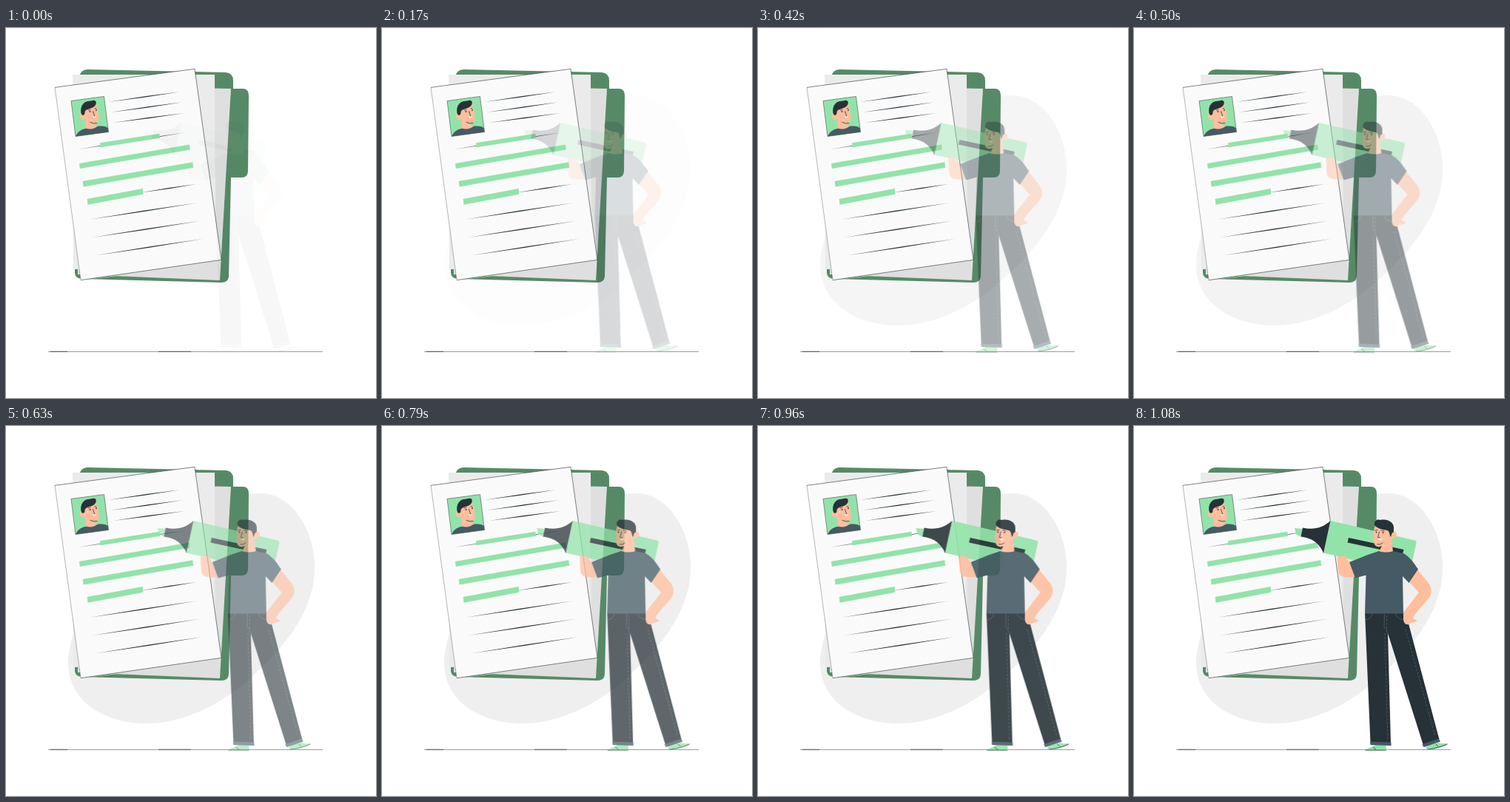
These frames come from a looping animation (500x500 px, 1.12 s). An HTML page:

```html
<!DOCTYPE html>
<html lang="en">
<head>
<meta charset="utf-8">
<title>Resume review</title>
<style>
  html, body { margin: 0; width: 100%; height: 100%; overflow: hidden; background: #fff; }
  svg { display: block; width: 100vw; height: 100vh; }
  .folder { fill: #568a66; }
  .green { fill: #92e3a9; }
  .dark { fill: #263238; }
  .slate { fill: #455a64; }
  .skin { fill: #ffbe9d; }
  .thin { fill: none; stroke: #263238; stroke-width: .8; stroke-linecap: round; }
  .seam { fill: none; stroke: #56666e; stroke-width: .7; }
  .stitch { stroke-dasharray: 3 2; }
</style>
</head>
<body>
<svg viewBox="0 0 500 500">
  <path id="blob" fill="#efefef" d="M340 91C385 88 417 140 417 190C417 255 370 305 325 345C285 380 235 402 190 402C130 402 84 370 84 320C84 295 95 260 120 230C180 160 280 95 340 91Z"/>

  <path stroke="#777" stroke-width=".8" d="M57 437.3H428"/>
  <path stroke="#444" stroke-width=".8" d="M60 437.3H83M206 437.3H250"/>

  <!-- folder and loose sheets -->
  <path class="folder" d="M99 66Q101 56 110 56L297 60Q307 61 307 71V82H320Q328 82 328 91L327 194Q326 202 319 202H304L301 336Q300 344 291 344L103 339Q93 338 93 331V325H99Z"/>
  <path fill="#dfdfdf" d="M110 78L304 82L289 341L97 333V325Z"/>
  <path fill="#ebebeb" d="M90 63H282L283 323L91 326Z"/>
  <path fill="#dfdfdf" d="M101 341L291 313L289 318L283 323L150 335Z"/>

  <!-- page -->
  <path fill="#fafafa" stroke="#263238" stroke-width=".6" d="M101 340.7L291 313.3L255 55.3L66 80.3"/>
  <path stroke="#263238" stroke-width=".35" d="M66 80.3L101 340.7"/>
  <g id="rules" class="dark"></g>
  <g id="marks" class="green"></g>

  <!-- portrait -->
  <path class="green" stroke="#263238" stroke-width=".5" d="M88 98.5L132.5 92.5L138.5 140.5L94 146.5Z"/>
  <path class="slate" d="M94 146.5C97 139 104 136 112 135L125 132.5C132 132 136 133 138 135.5L138.5 140.5Z"/>
  <path class="skin" d="M103 112L123 104C125 112 127 123 124 128C121 131 117 130 114 129L124 132.5C119 137 113 137 108 135.5L108 124C103 125 99 122 100 118C100 116 102 115 103 116Z"/>
  <path class="dark" d="M103 118C100 114 101 106 104 103C107 98 114 99 117 98C121 97 123 100 121 104C117 110 111 108 107 112L106 117Z"/>
  <path class="thin" d="M117.5 112.5L120 120L117 121M111 111L114 110.3M120 109L122 108.5M114 127.5Q119 130 123 128.5"/>
  <circle class="dark" cx="113.5" cy="113" r=".9"/><circle class="dark" cx="122" cy="111" r=".9"/>
  <path fill="#fff" d="M116 120.5L122 119Q120 123 116 120.5Z"/>

  <g id="man">
    <!-- highlighter -->
    <path class="green" d="M265.5 128L379 154.5Q382 155.500 381.500 158L374 192Q373 198 368 197L256 171.500Z"/>
    <path class="green" d="M217 138L229 139L225.500 149.500L219 146.500Z"/>
    <path class="dark" d="M228 137.500C243 141 256 137 265.500 128L256 172C252 160 241 151 225.500 149.500Z"/>
    <path class="dark" d="M290 151L364.500 167L363 173.500L288.500 157.500Z"/>

    <!-- shoes and trousers -->
    <path class="green" d="M312 438.500C314 435 321 435 326 431H340.500L341 438.500Z"/>
    <path class="green" d="M394 435L397 431L412 428C416 430 420 428 424 429.500C423 433 406 437 398 438Z"/>
    <path class="thin" stroke-width=".4" d="M313 438H340M397 437Q412 435 423 430M323 434L327 437M408 430L411 433"/>
    <path class="dark" d="M312 252H367L412.500 423.500L391 431.500L343 280L347 428H319.500Z"/>
    <path class="slate" d="M319 426.500L347.500 427.500V432L319.500 431Z"/>
    <path class="slate" d="M389.500 430L412 422.500L414 426.500L391.500 434Z"/>
    <path class="seam" d="M338.500 254L338 271Q341 274 342.500 280M313 262Q320 261 322 254M353 254Q357 262 368 262"/>
    <path class="seam stitch" d="M341.500 256V274M339 280L343 424M367 275L407 419"/>

    <!-- arms -->
    <path class="skin" d="M275 178C276 174 280 177 282 176C285 175 287 177 288 181L293 188L300 203.500C293 205 284 205 279 202C275 199 276 190 275 178Z"/>
    <path class="skin" d="M383 194L397 211C402 217 403 224 400 230C393 241 384 247 377 259C380 262 381 262 383 263C379 266 374 265 371 268C367 269 364 266 364 260V252L385 225L371 210Z"/>

    <!-- head -->
    <path class="skin" d="M326 134C323 143 323 153 325 160C328 165 333 163 335 162L331 170C337 175 345 175 350 170L348 152C352 153 355 150 355 146C355 142 351 142 349 144L345 134Z"/>
    <path class="dark" d="M325 134C324 129 328 125 333 127C342 125 351 130 351 137V143L348.500 145L347 150C345 148 346 142 342 141C337 140 329 139 325 134Z"/>
    <path class="thin" d="M331.500 143L329.500 150.500L332.500 151M326 141L329 140.500M334 141L338 142M329 160Q333 161 336 158"/>
    <circle class="dark" cx="327.500" cy="143.500" r=".9"/><circle class="dark" cx="336.500" cy="144" r=".9"/>
    <path fill="#fff" d="M329 152.500L335.500 152Q333 157 329 152.500Z"/>

    <path class="slate" d="M331 169C337 171 344 171 350 169L364 172C373 177 379 186 384 193.500L371.500 212L363 203L364 253.500H312L313.500 201.500L299 205.500L291 184L316 174Z"/>
  </g>
</svg>
<script>
const LOOP = 1120, STEPS = 27;
const byId = id => document.getElementById(id);

function addPath(parent, d) {
  const path = document.createElementNS("http://www.w3.org/2000/svg", "path");
  path.setAttribute("d", d);
  byId(parent).append(path);
}

// Pen stroke that tapers at both ends
function rule(x1, y1, x2, y2) {
  const mx = (x1 + x2) / 2, my = (y1 + y2) / 2;
  addPath("rules", `M${x1} ${y1}Q${mx} ${my - 1.4} ${x2} ${y2}Q${mx} ${my + 1.4} ${x1} ${y1}Z`);
}

// Highlighter bar, with its two upper corners and height
function mark(x1, y1, x2, y2, h) {
  addPath("marks", `M${x1} ${y1}L${x2} ${y2}l.8 ${h}L${x1 + .8} ${y1 + h}Z`);
}

[
  [138, 100, 235, 86.3], [141, 114, 238.5, 100.2], [145, 128, 241, 115],
  [97, 164, 242, 141.3], [182, 222.5, 257, 211],
  [113, 258.7, 258.5, 236.2], [117, 283, 262, 260.8], [121, 307.3, 266, 285]
].forEach(r => rule(...r));

[
  [127, 155.3, 207.3, 142.8, 6], [99, 183, 248, 157.5, 7],
  [103.7, 207, 252.3, 181.2, 7.5], [109.7, 231, 184.7, 217, 7.7]
].forEach(m => mark(...m));

// Held poses at 24 per second, rounded to 10 ms
function play(id, pose) {
  const frames = Array.from({ length: STEPS }, (_, n) => ({
    offset: Math.round(n * 25 / 6) * 10 / LOOP, easing: "step-end", ...pose(n)
  }));
  frames.push({ offset: 1, ...pose(STEPS - 1) });
  byId(id).animate(frames, { duration: LOOP, iterations: Infinity });
}

play("man", n => {
  const p = (n + 1) / STEPS;
  return { opacity: p, transform: `translateX(${-30 * (1 - p)}px)` };
});
play("blob", n => ({ opacity: Math.min(1, Math.max(0, (n - 3) / 12)) }));
</script>
</body>
</html>
```
